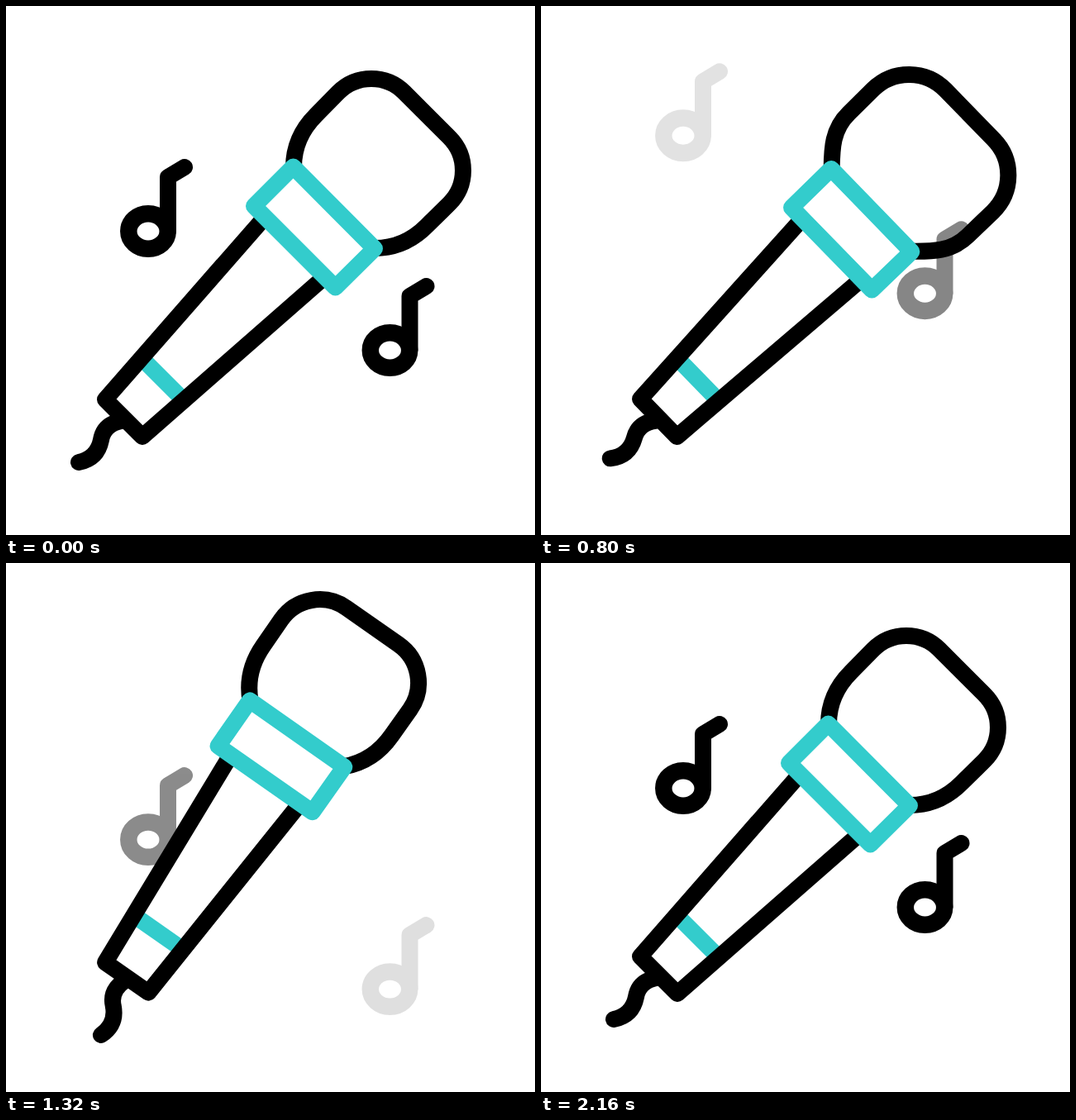
An HTML page for the animation above (2200 ms loop, 640 by 640 pixels).

```html
<!DOCTYPE html>
<html lang="en">
<head>
<meta charset="utf-8">
<title>Microphone</title>
<style>
  html, body { margin: 0; width: 100%; height: 100%; overflow: hidden; background: #fff; }
  svg { display: block; width: 100vw; height: 100vh; }
  .line { fill: none; stroke: #000; stroke-width: 20; stroke-linecap: round; stroke-linejoin: round; }
  .teal { stroke: #3cc; }
</style>
</head>
<body>
<svg viewBox="0 0 640 640">
  <defs>
    <g id="note" class="line">
      <ellipse cx="172" cy="272.5" rx="23.7" ry="21.2" stroke-width="20.5"/>
      <path d="M196 272V207L216 195"/>
    </g>
  </defs>
  <g id="mic" class="line">
    <path id="cord" d="M139 502C125 505 117 513 115 525C112 540 103 549 88 552"/>
    <path class="teal" stroke-linecap="butt" d="M164 426L215 477"/>
    <path d="M307.5 262L120 476L165 521L379 333.5"/>
    <path id="head"/>
    <path class="teal" d="M347.5 194.5L300 242L398.5 340.5L446 293.5Z"/>
  </g>
  <g id="left"><use href="#note"/></g>
  <g id="right"><use href="#note" x="292.5" y="144"/></g>
</svg>
<script>
  const LOOP = 2200, STEP = 40;
  const RISE = 130, DROP = 113, POWER = 2.15;

  // [time, value] pairs, eased in and out between neighbours
  const swing = [[20, 0], [550, 10], [600, 10], [1060, -13], [1160, -13], [1742, 3], [2090, 0]];
  const whip = [[190, 0], [620, 10], [1163, -13.3], [1230, -13.3], [1780, 3.8], [2160, 0]];
  const swell = [[320, 1], [720, 1.09], [880, 1.09], [1280, 1]];

  const byId = id => document.getElementById(id);
  const mic = byId('mic'), cord = byId('cord'), head = byId('head');
  const notes = [
    { el: byId('left'), out: [80, 840], back: [1107, 1984], power: POWER },
    { el: byId('right'), out: [160, 980], back: [1268, 2145], power: 2.57 }
  ];

  const part = (t, a, b) => Math.min(1, Math.max(0, (t - a) / (b - a)));

  function track(keys, t) {
    let value = keys[0][1];
    for (let i = 1; i < keys.length; i++) {
      const [t0, v0] = keys[i - 1], [t1, v1] = keys[i];
      if (t < t0) break;
      const p = part(t, t0, t1);
      value = v0 + (v1 - v0) * p * p * (3 - 2 * p);
    }
    return value;
  }

  // The dome swells about its middle while both ends stay on the collar
  function headPath(size) {
    const at = (x, y) => `${455 + (x - 455) * size} ${185 + (y - 185) * size}`;
    const r = 56.6 * size;
    const arc = `A${r} ${r} 0 0 1 `;
    return `M348 195C348 170 ${at(357, 150)} ${at(375, 132)}` +
      `L${at(402, 104.6)}${arc}${at(482, 104.6)}` +
      `L${at(536.4, 159)}${arc}${at(536.4, 239)}` +
      `L${at(509, 266)}C${at(491, 284)} 471 293 446 293`;
  }

  function moveNote({ el, out, back, power }, t) {
    const leaving = t < back[0];
    const away = leaving
      ? part(t, ...out) ** power
      : (1 - part(t, ...back)) ** POWER;
    const y = away * (leaving ? -RISE : DROP);
    el.setAttribute('transform', `translate(0 ${y})`);
    el.setAttribute('opacity', 1 - away);
  }

  function draw(t) {
    mic.setAttribute('transform', `rotate(${track(swing, t)} 161 479)`);
    cord.setAttribute('transform', `rotate(${track(whip, t)} 139 502)`);
    head.setAttribute('d', headPath(track(swell, t)));
    notes.forEach(note => moveNote(note, t));
  }

  const start = performance.now();
  function tick() {
    const t = (performance.now() - start) % LOOP;
    draw(Math.floor(t / STEP) * STEP);
    requestAnimationFrame(tick);
  }
  tick();
</script>
</body>
</html>
```
